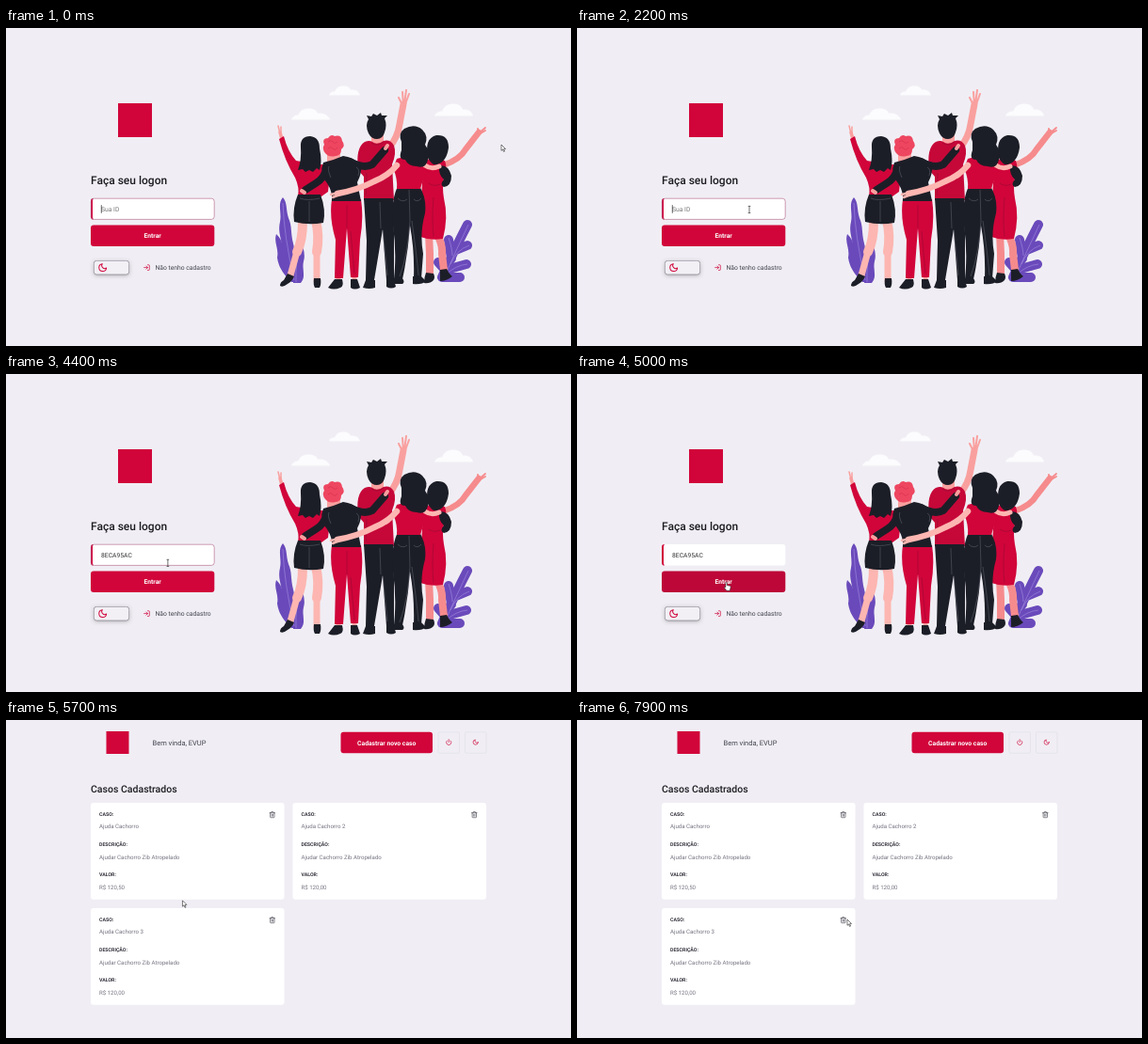
Animation, 600 px wide and 338 px high, one loop 8000 ms. Source, as an HTML page:

```html
<!DOCTYPE html>
<html lang="pt">
<head>
<meta charset="utf-8">
<style>
  html, body { margin: 0; width: 100%; height: 100%; overflow: hidden; background: #f0eef4; }
  svg { display: block; width: 100vw; height: 100vh; }
  text { font-family: Roboto, sans-serif; font-size: 6.75px; fill: #41414d; text-rendering: geometricPrecision; }
  .title { font-size: 12px; font-weight: 500; fill: #1b1b20; }
  .subtitle { font-size: 10.5px; }
  .button { font-weight: 700; fill: #fff; text-anchor: middle; }
  .label { font-size: 5.25px; font-weight: 700; fill: #30303a; }
  .value { font-size: 6.1px; fill: #737380; }
  .icon { fill: none; stroke-width: 2.3; stroke-linecap: round; stroke-linejoin: round; }
  .red { fill: #d1053a; } .dark { fill: #1c1e27; } .leaf { fill: #6a4abb; }
  .limb { fill: none; stroke: #f9a09f; stroke-linecap: round; stroke-linejoin: round; }
  .fair { stroke: #fdb6b1; } .tan { stroke: #f68b8d; }
  .sleeve { fill: none; stroke: #1c1e27; stroke-linecap: round; stroke-linejoin: round; }
  .seam { fill: none; stroke: #777986; stroke-width: .4; }
  .fold { fill: none; stroke: #8d0a30; stroke-width: .5; }
  .lobe { fill: none; stroke: #6a4abb; stroke-width: 10; stroke-linecap: round; }
  .vein { fill: none; stroke: #b7a4ee; stroke-width: .45; }
</style>
</head>
<body>
<svg viewBox="0 0 600 338" preserveAspectRatio="none">
  <defs>
    <filter id="shadow" x="-30%" y="-50%" width="160%" height="220%">
      <feDropShadow dx="0" dy="1" stdDeviation="2.2" flood-color="#555" flood-opacity=".4"/>
    </filter>
  </defs>

  <g id="login">
    <rect class="red" x="119" y="80" width="36" height="36"/>
    <text class="title" x="90" y="166">Faça seu logon</text>
    <rect x="90" y="181" width="131.300" height="22.500" rx="3" fill="#fff"/>
    <path class="red" d="M93 181h-.2a2.8 2.8 0 0 0-2.8 2.8v16.900a2.800 2.800 0 0 0 2.800 2.800h.2q-1-1-1-3v-16.500q0-2 1-3z"/>
    <rect id="focus" x="90.300" y="181.200" width="130.900" height="22.200" rx="3" fill="none" stroke="#b2668a" stroke-width=".65"/>
    <text id="field" x="101" y="194.700"></text>
    <path id="caret" stroke="#222" stroke-width=".7"/>
    <rect id="enter" x="90" y="209.500" width="131.300" height="22.500" rx="3"/>
    <text class="button" x="155.600" y="223.200">Entrar</text>
    <rect x="93.300" y="247.300" width="37.400" height="14.700" rx="3" fill="#f2f0f5" stroke="#77737f" stroke-width=".6" filter="url(#shadow)"/>
    <text x="158.500" y="256.900">Não tenho cadastro</text>

    <g id="clouds" fill="#fcfbfd">
      <path d="M343 71.500q1-4 6-4q2-6 9-6q6 0 8 4q8-1 10 6z"/>
      <path d="M303 97.500q2-5 7-5q3-7 11-7q8 0 10 5q10-1 13 7z"/>
      <path d="M455 93.500q2-5 8-5q3-8 12-8q8 0 10 6q9-1 11 7z"/>
    </g>

    <g id="plants">
      <path class="leaf" d="M294 180C288 187 293 196 291 206C288 218 294 226 293 236C294 249 300 260 304 270H308C304 250 308 240 305 229C302 217 304 211 300 202C297 192 299 186 294 180Z"/>
      <path class="leaf" d="M287 219C284 228 290 234 288 244C290 258 298 264 303 270H310C306 258 304 248 298 243C293 234 295 226 287 219ZM315 222C306 229 309 236 305 243C301 252 306 262 305 271H313C319 264 314 257 316 248C319 238 313 231 315 222Z"/>
      <path class="lobe" d="M463 265Q474 240 490 209M473 245L470 225M467 258L459 249M478 236L490 231M471 256L489 251M464 265H482"/>
      <path class="vein" d="M294 186Q295 220 306 268M313 226Q307 250 308 270M491 209Q478 236 464 268M470 223Q474 235 474 242M492 231Q478 236 472 251M490 251Q478 252 467 262"/>
    </g>

    <g id="woman-right">
      <path class="limb tan" stroke-width="8" d="M449 218L450 240L450 260M457 218Q464 230 463 240L465 257"/>
      <path class="dark" d="M446 260L454 261Q456 265 454 268Q450 272 444 271Q444 265 446 260ZM461 257L468 256Q471 262 474 264Q468 269 461 269Z"/>
      <path class="limb tan" stroke-width="6.500" d="M464 146Q482 140 488 129L502 111"/>
      <path class="limb tan" stroke-width="1.800" d="M502 112L509 106M502 113L501 107M504 112L509 109"/>
      <path class="red" d="M444 141Q453 137 466 141Q469 148 465 160Q463 169 465 181Q470 201 464 224Q450 226 440 222Q440 180 444 141Z"/>
      <path class="dark" d="M448 138Q444 117 457 114Q470 113 470 127Q468 142 458 145Q453 147 448 138ZM460 146Q470 145 473 157Q473 168 465 169Q460 167 465 161Q459 156 460 146Z"/>
      <path class="fold" d="M449 165Q454 169 461 166M454 180Q452 204 454 222"/>
    </g>

    <g id="man">
      <path class="limb" stroke-width="7" d="M407 127Q416 116 418 102L422 81"/>
      <path class="limb" stroke-width="2" d="M422 82L421 68M423 81L425 66M424 81L428 70M421 82L417 74"/>
      <path d="M388 106H401V123Q394 129 388 122Z" fill="#f9a09f"/>
      <path d="M381 121Q386 119 389 121Q394 125 401 120Q408 118 412 125Q415 133 410 145L412 183H380V158L374 151Q371 127 381 121Z" fill="#c60839"/>
      <path class="dark" d="M385 112Q381 103 385 97L383 93L388 94L390 91L394 93L398 90L399 93L405 93L402 96Q405 103 402 111Q400 118 394 118Q388 118 385 112ZM380 181H411L412 218L412 268H404L400 214L391 268H382L383 226Z"/>
      <path class="dark" d="M382 268H392V276Q386 278 379 276ZM404 268H412L414 275Q409 278 404 275Z"/>
      <path class="seam" d="M397 185L398 213M400 215L405 263"/>
      <path class="fold" d="M388 122Q394 127 401 121M383 154L382 178"/>
    </g>

    <g id="woman-middle">
      <path class="dark" d="M416 168H439Q447 181 445 197Q439 218 443 240L441 266H433Q434 237 429 210Q427 240 421 267H412Q415 238 411 210Q408 185 416 168ZM412 266H421Q424 270 421 272H411ZM432 264H441L446 269Q442 273 432 272Z"/>
      <path class="seam" d="M428 172L429 205Q427 240 418 264M431 205Q436 240 438 263M416 181Q421 186 426 182M433 182Q437 186 441 181"/>
      <path class="red" d="M415 139Q430 133 446 141Q449 152 443 161L440 171H415Q416 160 411 149Z"/>
      <path class="limb fair" stroke-width="5" d="M445 146Q452 151 460 147"/>
      <path class="dark" d="M420 121Q416 112 423 107Q434 101 442 108Q449 115 445 124Q451 132 448 140Q446 150 436 147Q427 147 424 140Q416 140 420 130Z"/>
    </g>

    <g id="woman-left">
      <path class="limb fair" stroke-width="10" d="M315 206Q315 226 309 238"/>
      <path class="limb fair" stroke-width="7" d="M310 234L302 263M330 234V268"/>
      <path class="limb fair" stroke-width="10" d="M329 205Q333 220 330 238"/>
      <path class="dark" d="M299 261L306 264Q304 269 299 272Q294 276 291 274Q291 270 295 268ZM327 266H334Q335 272 333 276H328Q326 273 327 266Z"/>
      <path class="limb" stroke-width="3.500" d="M291 111L293 118"/>
      <path class="limb" stroke-width="1.500" d="M291 112L289 104M292 112L292 105"/>
      <path class="red" d="M290 118L295 115Q299 131 308 141Q323 144 345 146L342 174L335 179H310Q312 170 307 159Q296 141 290 118Z"/>
      <path class="dark" d="M310 177H334Q340 193 337 207Q321 210 306 206Q304 191 310 177ZM313 127Q312 115 323 115Q333 116 333 128Q336 142 333 151L330 149L326 153L322 151L318 153L315 150L310 151Q314 140 313 127Z"/>
      <path class="seam" d="M312 181Q320 184 333 181M322 184V206"/>
    </g>

    <g id="friend">
      <path class="limb" stroke-width="5" d="M353 261V268M370 261V268"/>
      <path class="dark" d="M349 267H357Q359 275 355 276Q348 279 342 276ZM366 267H373L376 276Q370 279 366 276Z"/>
      <path class="red" d="M346 182H377Q380 202 376 225L374 265H366L362 213L358 266H349L350 225Q343 202 346 182Z"/>
      <path class="fold" d="M362 188V213M366 216L370 261"/>
      <path d="M341 127H355V143H341Z" fill="#f9a09f"/>
      <path d="M339 133Q335 128 338 124Q335 117 342 117Q345 112 349 115Q356 113 357 120Q361 125 356 129Q356 136 350 136Q343 138 339 133Z" fill="#ee4660"/>
      <path d="M342 121q3-3 5 0t5 0M342 128q3-3 5 0t5-1" fill="none" stroke="#d42c4c" stroke-width=".6"/>
      <path class="dark" d="M337 143Q349 140 358 136Q368 137 377 145Q378 155 373 164L377 184H346Q347 174 341 165Q332 155 337 143Z"/>
      <path class="sleeve" stroke-width="8" d="M342 147Q337 161 329 165L318 172M365 142Q380 150 389 145L402 130"/>
      <path class="limb" stroke-width="4" d="M317 175L314 173M403 128L405 125"/>
      <path class="limb fair" stroke-width="6.500" d="M415 146Q406 157 391 163Q374 172 352 176"/>
      <path class="limb fair" stroke-width="2.500" d="M353 175L345 177M354 177L347 180"/>
      <path class="seam" d="M345 159Q341 150 343 147M374 157Q376 150 372 148"/>
    </g>
  </g>

  <g id="dashboard">
    <rect class="red" x="106.500" y="12" width="24" height="24"/>
    <text x="155.500" y="26.500" style="font-size:7.5px">Bem vinda, EVUP</text>
    <rect class="red" x="355.500" y="12.800" width="97.500" height="22.500" rx="3"/>
    <text class="button" x="404.200" y="26.500">Cadastrar novo caso</text>
    <g fill="none" stroke="#dedce6" stroke-width=".6">
      <rect x="459" y="12.800" width="22.500" height="22.500" rx="1.500"/>
      <rect x="487.500" y="12.800" width="22.500" height="22.500" rx="1.500"/>
    </g>
    <text class="title subtitle" x="90" y="76.500">Casos Cadastrados</text>
    <g id="cards"></g>
  </g>

  <g id="cursor" stroke-linejoin="round">
    <path id="arrow" d="M0 0V6.300L1.500 5L2.600 7.500L3.600 7L2.500 4.700L4.500 4.500Z" fill="#fff" stroke="#222" stroke-width=".6"/>
    <path id="beam" d="M-1.300-3.600H1.300M0-3.600V3.600M-1.300 3.600H1.300" stroke="#333" stroke-width=".7"/>
    <path id="hand" transform="scale(1.15)" d="M0 0Q.8-.6 1.200.2V2.700L4 3.300Q4.700 3.600 4.500 4.500L3.800 7.600H.7L-1.500 4.800Q-1.300 3.900-.2 4.600Z" fill="#fff" stroke="#222" stroke-width=".5"/>
  </g>
</svg>

<script>
const $ = id => document.getElementById(id);
const RED = '#d1053a';
const LOOP = 8000, DASHBOARD_AT = 5100, CARDS_AT = 5200, PASTE_AT = 3900, BLUR_AT = 4800;

const ICONS = {
  moon: 'M21 12.8A9 9 0 1 1 11.2 3 7 7 0 0 0 21 12.8z',
  power: 'M18.4 6.6a9 9 0 1 1-12.8 0M12 2v10',
  enter: 'M15 3h4a2 2 0 0 1 2 2v14a2 2 0 0 1-2 2h-4M10 17l5-5-5-5M15 12H3',
  trash: 'M3 6h18M19 6v14a2 2 0 0 1-2 2H7a2 2 0 0 1-2-2V6m3 0V4a2 2 0 0 1 2-2h4a2 2 0 0 1 2 2v2M10 11v6M14 11v6'
};

function icon(name, cx, cy, size, color = RED) {
  const scale = size / 24;
  return `<path class="icon" stroke="${color}" d="${ICONS[name]}"
    transform="translate(${cx - size / 2} ${cy - size / 2}) scale(${scale})"/>`;
}

function card(x, y, name, amount) {
  const rows = [['CASO:', name], ['DESCRIÇÃO:', 'Ajudar Cachorro Zib Atropelado'], ['VALOR:', 'R$ ' + amount]];
  return `<rect x="${x}" y="${y}" width="205.5" height="102.7" rx="3" fill="#fff"/>` +
    rows.map(([label, value], i) => {
      const top = y + 32.2 * i;
      return `<text class="label" x="${x + 9}" y="${top + 14}">${label}</text>
        <text class="value" x="${x + 9}" y="${top + 27.4}">${value}</text>`;
    }).join('') + icon('trash', x + 192.8, y + 12.6, 7.5, '#555560');
}

$('login').insertAdjacentHTML('beforeend', icon('moon', 102.7, 254.6, 10.5) + icon('enter', 149.5, 254.6, 7.5));
$('dashboard').insertAdjacentHTML('beforeend', icon('power', 470.2, 23.6, 7) + icon('moon', 498.7, 23.6, 7));
$('cards').innerHTML = card(90, 88, 'Ajuda Cachorro', '120,50') +
  card(304.5, 88, 'Ajuda Cachorro 2', '120,00') +
  card(90, 200, 'Ajuda Cachorro 3', '120,00');

// Pointer waypoints: time, x, y
const POINTER = [
  [0, 526, 124], [1300, 526, 124], [1400, 505, 127], [1600, 402, 151], [1800, 300, 176],
  [2000, 222, 190], [2200, 183, 193], [2300, 176.5, 194], [4300, 176.5, 194],
  [4700, 158, 221.5], [5000, 158, 221.5], [5100, 156, 221], [5300, 156, 221], [6000, 211, 170],
  [6100, 211, 170], [6400, 213, 206], [6500, 213, 206], [6600, 217, 197], [6800, 223, 190],
  [7000, 223, 190], [7400, 300, 172], [7600, 317, 180], [7900, 287, 212], [LOOP, 287, 212]
];
const CARET_ON = [[0, 400], [1000, 1500], [2100, 2600], [3100, 3600], [3900, 4400]];

function pointerAt(t) {
  const next = POINTER.findIndex(point => point[0] > t);
  const [t0, x0, y0] = POINTER[next - 1], [t1, x1, y1] = POINTER[next];
  const k = (t - t0) / (t1 - t0);
  return [x0 + (x1 - x0) * k, y0 + (y1 - y0) * k];
}

const show = (id, visible) => $(id).style.display = visible ? '' : 'none';

function draw(t) {
  const login = t < DASHBOARD_AT, pasted = t >= PASTE_AT;
  show('login', login);
  show('dashboard', !login);
  show('cards', t >= CARDS_AT);

  $('field').textContent = pasted ? '8ECA95AC' : 'Sua ID';
  $('field').style.fill = pasted ? '#333' : '#757575';
  $('caret').setAttribute('d', `M${pasted ? 134.6 : 101.3} 188.2V196.8`);
  show('caret', CARET_ON.some(([from, to]) => t >= from && t < to));
  show('focus', t < BLUR_AT);

  const [x, y] = pointerAt(t);
  const inForm = login && x > 90 && x < 221.3;
  const overField = inForm && y > 181 && y < 203.5;
  const overButton = inForm && y > 209.5 && y < 232;
  show('beam', overField);
  show('hand', overButton);
  show('arrow', !overField && !overButton);
  $('enter').style.fill = overButton ? '#bd0738' : RED;
  $('cursor').setAttribute('transform', `translate(${x} ${y})`);
}

function tick() {
  draw(Math.floor(performance.now() % LOOP / 100) * 100);
  requestAnimationFrame(tick);
}
tick();
</script>
</body>
</html>
```
